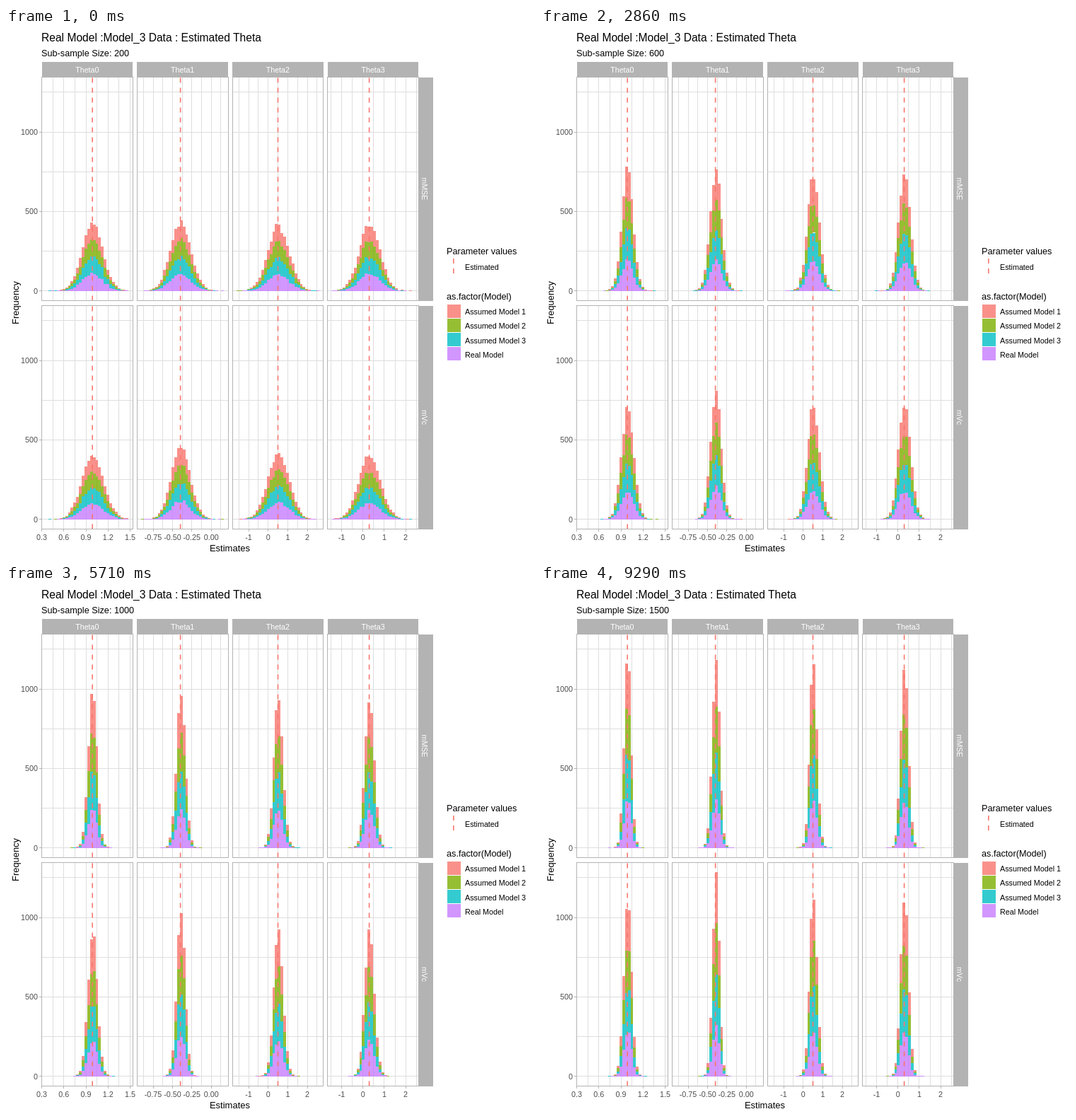
These frames come from a looping animation (748 px wide and 748 px high, 10 s). An HTML page:

```html
<!DOCTYPE html>
<html lang="en">
<head>
<meta charset="utf-8">
<title>Estimated theta by sub-sample size</title>
<style>
  html, body { margin: 0; width: 100%; height: 100%; overflow: hidden; background: #fff; }
  svg { display: block; width: 100vw; height: 100vh; font-family: "Liberation Sans", Arial, sans-serif; }
  path, rect, line { shape-rendering: crispEdges; }
  .vline { stroke: #f8766d; stroke-width: 2; stroke-dasharray: 7 7; shape-rendering: auto; stroke-width: 1.6; }
</style>
</head>
<body>
<svg id="chart" viewBox="0 0 748 748"></svg>
<script>
const LOOP = 10000, STATES = 14;
const PANEL_W = 128.7, PANEL_H = 316, TOP = 69.5, ROW_STEP = 323;
const BASE = 371.7, UNIT = 0.2246;             // y of zero, pixels per count
const BINS = 30, BIN_W = PANEL_W / 1.1 / BINS;
const COLORS = ['#c77cff', '#00bfc4', '#7cae00', '#f8766d'];
const MODELS = ['Real Model', 'Assumed Model 3', 'Assumed Model 2', 'Assumed Model 1'];
const ROWS = ['mMSE', 'mVc'];

// zero/step: first labelled tick and its spacing; sd: spread in pixels at sizes 200 and 1500, per row
const PANELS = [
  { name: 'Theta0', left: 50.5, line: 122.2, tick: 50.5, step: 31.25, labels: ['0.3', '0.6', '0.9', '1.2', '1.5'],
    mean: [122.5, 122.6], sd: [[14.3, 4.9], [15.3, 5.45]] },
  { name: 'Theta1', left: 185.3, line: 246.6, tick: 208, step: 27.4, labels: ['-0.75', '-0.50', '-0.25', '0.00'],
    mean: [247.3, 247.4], sd: [[14.2, 5.1], [13.3, 4.65]] },
  { name: 'Theta2', left: 320, line: 384.5, tick: 343, step: 27.7, labels: ['-1', '0', '1', '2'],
    mean: [385.2, 385.3], sd: [[15, 5.1], [14.9, 5.3]] },
  { name: 'Theta3', left: 454.7, line: 513.6, tick: 474.5, step: 30.2, labels: ['-1', '0', '1', '2'],
    mean: [514.2, 514.2], sd: [[14.5, 5.2], [15.2, 5.3]] }
];

const rect = (x, y, w, h, attrs) => `<rect x="${x}" y="${y}" width="${w}" height="${h}" ${attrs}/>`;
const line = (x1, y1, x2, y2, attrs) => `<line x1="${x1}" y1="${y1}" x2="${x2}" y2="${y2}" ${attrs}/>`;
const text = (x, y, size, content, attrs = '') => `<text x="${x}" y="${y}" font-size="${size}" ${attrs}>${content}</text>`;
const turned = (x, y, angle, size, content, attrs = '') =>
  text(0, 0, size, content, `text-anchor="middle" transform="translate(${x} ${y}) rotate(${angle})" ${attrs}`);

const MIDDLE = 'text-anchor="middle"', GREY = 'fill="#4d4d4d"';
const GRID = 'stroke="#dedede"', EDGE = 'stroke="#b3b3b3"';

function randomFrom(seed) {
  return () => {
    seed = seed + 0x6d2b79f5 | 0;
    let t = Math.imul(seed ^ seed >>> 15, 1 | seed);
    t = t + Math.imul(t ^ t >>> 7, 61 | t) ^ t;
    return ((t ^ t >>> 14) >>> 0) / 4294967296;
  };
}

const normalCdf = z => 1 / (1 + Math.exp(-1.5976 * z - 0.07056 * z ** 3));
// a narrow bell with a small share of wider outliers
const cdf = z => 0.97 * normalCdf(z) + 0.03 * normalCdf(z / 2);

function histogram(panel, row, size) {
  const [wide, narrow] = panel.sd[row];
  const sd = wide * (narrow / wide) ** (Math.log(size / 200) / Math.log(7.5));
  const random = randomFrom(size * 31 + panel.left * 7 + row);
  const start = panel.left + (PANEL_W - BINS * BIN_W) / 2;
  const base = BASE + row * ROW_STEP;
  const paths = COLORS.map(() => '');
  for (let bin = 0; bin < BINS; bin++) {
    const x = start + bin * BIN_W;
    const z = (x - panel.mean[row]) / sd;
    const expected = 1000 * (cdf(z + BIN_W / sd) - cdf(z));
    let y = base;
    COLORS.forEach((_, i) => {
      const noise = (random() + random() - 1) * Math.sqrt(expected) * 1.2;
      const h = Math.max(0, Math.round(expected + noise)) * UNIT;
      y -= h;
      if (h) paths[i] += `M${x.toFixed(2)} ${y.toFixed(2)}h${BIN_W.toFixed(2)}v${h.toFixed(2)}h${-BIN_W.toFixed(2)}z`;
    });
  }
  return paths.map((d, i) => `<path d="${d}" fill="${COLORS[i]}" fill-opacity=".8"/>`).join('');
}

function panelGrid(panel, top) {
  const right = panel.left + PANEL_W, bottom = top + PANEL_H;
  let out = '';
  for (let x = panel.tick - panel.step / 2; x < right; x += panel.step / 2)
    if (x > panel.left) out += line(x, top, x, bottom, GRID);
  for (let count = 0; count <= 1250; count += 250) {
    const y = BASE - TOP + top - count * UNIT;
    out += line(panel.left, y, right, y, GRID);
  }
  return out;
}

function background() {
  let out = rect(0, 0, 748, 748, 'fill="#fff"');
  for (const panel of PANELS) {
    out += rect(panel.left, 48, PANEL_W, 21, 'fill="#b3b3b3"');
    out += text(panel.left + PANEL_W / 2, 63, 10.7, panel.name, MIDDLE + ' fill="#fff"');
    panel.labels.forEach((label, i) => {
      const x = panel.tick + i * panel.step;
      out += line(x, 709, x, 712, EDGE) + text(x, 723.5, 10.75, label, MIDDLE + ' ' + GREY);
    });
    ROWS.forEach((_, row) => out += panelGrid(panel, TOP + row * ROW_STEP));
  }
  ROWS.forEach((name, row) => {
    const top = TOP + row * ROW_STEP;
    out += rect(583.4, top, 21, PANEL_H, 'fill="#b3b3b3"');
    out += turned(587.5, top + PANEL_H / 2, 90, 10.6, name, 'fill="#fff"');
    for (const count of [0, 500, 1000]) {
      const y = BASE + row * ROW_STEP - count * UNIT;
      out += line(47, y, 50, y, EDGE) + text(45, y + 4, 10.75, count, 'text-anchor="end" ' + GREY);
    }
  });
  return out;
}

function foreground() {
  let out = '';
  ROWS.forEach((_, row) => {
    const top = TOP + row * ROW_STEP, bottom = top + PANEL_H;
    for (const panel of PANELS) {
      out += line(panel.line, bottom, panel.line, top, 'class="vline"');
      out += rect(panel.left, top, PANEL_W, PANEL_H, 'fill="none" ' + EDGE);
    }
  });
  out += text(50, 19, 15.6, 'Real Model :Model_3 Data : Estimated Theta');
  out += text(316.5, 740, 13, 'Estimates', MIDDLE) + turned(17.5, 388.5, -90, 12.9, 'Frequency');
  out += text(623, 319.5, 12.7, 'Parameter values') + text(649, 341.5, 10.75, 'Estimated');
  out += line(632.8, 347, 632.8, 326, 'class="vline"');
  out += text(623, 383.5, 12.7, 'as.factor(Model)');
  MODELS.forEach((name, i) => {
    const y = 391 + (3 - i) * 20.1;
    out += rect(624, y, 18.5, 18.5, `fill="${COLORS[i]}" fill-opacity=".8"`);
    out += text(649, y + 14.3, 10.75, name);
  });
  return out;
}

const chart = document.getElementById('chart');
chart.innerHTML = background() + '<g id="bars"></g>' + foreground() + text(50, 39.5, 12.7, '', 'id="size"');
const bars = document.getElementById('bars'), sizeLabel = document.getElementById('size');

const states = Array.from({ length: STATES }, (_, i) => {
  const size = 200 + 100 * i;
  return {
    start: Math.round(i * LOOP / STATES / 10) * 10,
    label: 'Sub-sample Size: ' + size,
    bars: PANELS.map(panel => ROWS.map((_, row) => histogram(panel, row, size)).join('')).join('')
  };
});

let shown;
function draw(now) {
  const time = now % LOOP;
  const state = states.filter(s => s.start <= time).pop();
  if (state !== shown) {
    bars.innerHTML = state.bars;
    sizeLabel.textContent = state.label;
    shown = state;
  }
  requestAnimationFrame(() => draw(performance.now() - begin));
}
const begin = performance.now();
draw(0);
</script>
</body>
</html>
```
